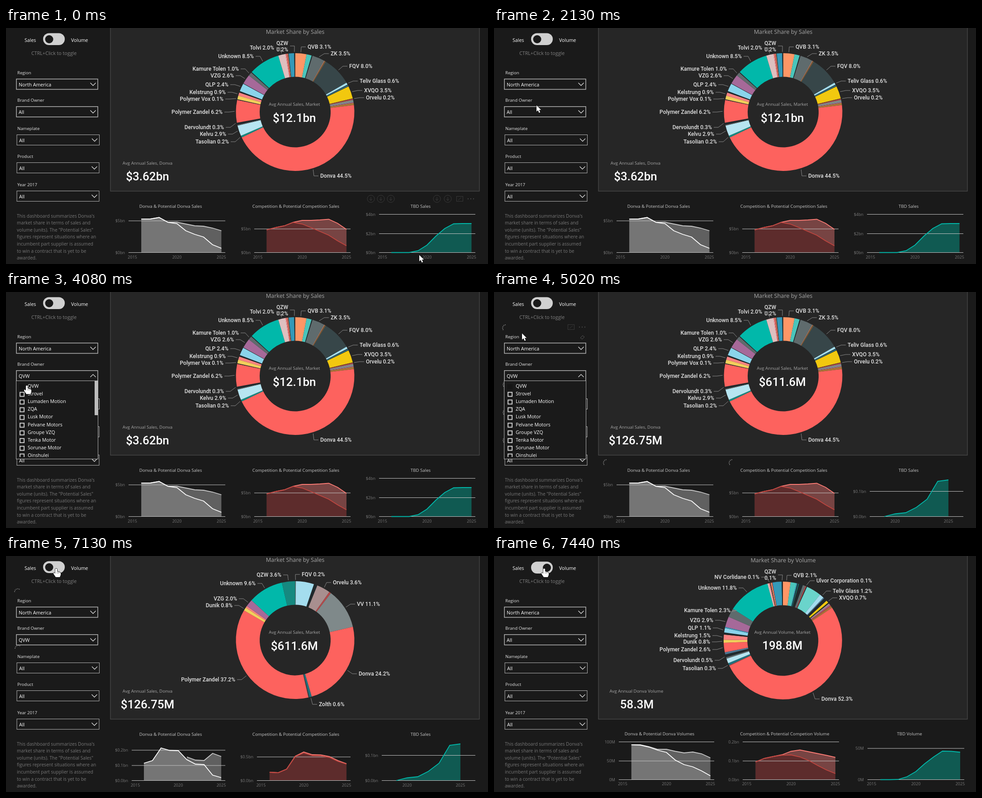
Animation, 1066 px wide and 525 px high, one loop 8000 ms. Source, as an HTML page with a canvas:

```html
<!DOCTYPE html>
<html lang="en">
<head>
<meta charset="utf-8">
<title>Market share dashboard</title>
<style>
html, body { margin: 0; width: 100%; height: 100%; overflow: hidden; background: #1a1a1a; }
canvas { display: block; }
</style>
</head>
<body>
<canvas id="stage" width="1066" height="525"></canvas>
<script>
const c = document.getElementById('stage').getContext('2d');
const LOOP = 8000, BG = '#1a1a1a';
const UI = '"Open Sans", "Noto Sans", sans-serif', NUM = 'Roboto, Inter, sans-serif';

const palette = {
  o: '#fe9666', t: '#4ac5bb', g: '#5f6b6d', d: '#374649', k: '#20292c', b: '#a4ddee',
  y: '#f2c80f', Y: '#f2cf5b', r: '#fd625e', R: '#b5494a', s: '#fb8281', p: '#a66999',
  l: '#8ad4eb', c: '#b7e5f1', P: '#dfbfbf', B: '#3599b8', T: '#01b8aa', e: '#168980',
  E: '#1f7380', G: '#7f898a', w: '#a88f8f', n: '#a87436', m: '#6ad4cb', h: '#4d7591'
};

// Slices run clockwise from the top: end percentage, then palette letter.
const rings = {
  sales: '3.1o 4.5t 4.75k 8.2g 8.35o 8.45k 8.6n 16.7d 17.3b 17.5k 17.7B 17.85k 21.3y 21.4k 21.7R 22.3G 22.5p 23.1n ' +
    '67.9r 68.4e 71.3c 71.5g 72.1k 78.3r 78.5k 79.5Y 80.4s 80.8k 83l 83.1k 85.7p 86.7g 86.9k 95.4T 97.4P 97.7s 97.9R 98.1o 98.25k 99.75B 100k',
  brand: '.2g 5.15b 6.1k 9.8w 10.3R 21.4G 45.5r 46.1E 46.4d 83.4r 84.3Y 84.8s 86.8p 96.4T 100e',
  volume: '2.1o 3.7t 3.95B 4.2k 4.4e 5.5k 6.2g 6.5R 6.7k 10.8m 12b 12.3h 13.2k 13.9y 14.2k 14.5w 14.8p 15.1R 15.6n ' +
    '67.9r 68.1R 68.7E 70c 70.4g 71.2k 71.8h 74.4r 75.2Y 76.6s 77.2k 78.4l 78.7B 81.6p 84.05g 95.8T 96.2P 96.5s 96.7k 97o 97.2R 99.7B 100k'
};

// Text, x of the edge next to the leader, y, percentage the leader points at.
const labels = {
  sales: [
    ['QVB 3.1%', 667, 42, 1.5], ['ZK 3.5%', 718, 57, 6.5], ['FQV 8.0%', 759, 85, 12.7],
    ['Teliv Glass 0.6%', 782, 118, 17], ['XVQO 3.5%', 792, 139, 19.5], ['Orvelu 0.2%', 796, 155, 21.4],
    ['Donva 44.5%', 695, 329, 45.2], ['QZW', 624, 34], ['0.2%', 624, 48], ['', 624, 40, 99.8],
    ['Tolvi 2.0%', 593, 44, 96.4], ['Unknown 8.5%', 548, 63, 91], ['Kamure Tolen 1.0%', 515, 91, 86.2],
    ['VZG 2.6%', 504, 106, 84.4], ['QLP 2.4%', 492, 126, 82], ['Kelstrung 0.9%', 486, 143, 79.9],
    ['Polymer Vox 0.1%', 481, 158, 78.6], ['Polymer Zandel 6.2%', 479, 187, 75.2],
    ['Dervolundt 0.3%', 482, 221, 72], ['Kelvu 2.9%', 487, 236, 69.9], ['Tasolian 0.2%', 493, 253, 68.1]
  ],
  brand: [
    ['FQV 0.2%', 654, 41, .1], ['Orvelu 3.6%', 723, 59, 8], ['VV 11.1%', 776, 107, 15.8],
    ['Donva 24.2%', 780, 262, 33.4], ['Zolth 0.6%', 692, 330, 45.8], ['QZW 3.6%', 609, 42, 98.2],
    ['Unknown 9.6%', 552, 61, 91.6], ['VZG 2.0%', 511, 95, 85.8], ['Dunik 0.8%', 501, 110, 83.8],
    ['Polymer Zandel 37.2%', 507, 275, 64.9]
  ],
  volume: [
    ['QVB 2.1%', 662, 43, 1], ['Ulvor Corporation 0.1%', 713, 55, 6.4], ['Teliv Glass 1.2%', 749, 78, 11.4],
    ['XVQO 0.7%', 763, 93, 13.6], ['Donva 52.3%', 724, 318, 41.7], ['QZW', 624, 35], ['0.1%', 624, 49],
    ['', 624, 42, 99.8], ['NV Corlidane 0.1%', 587, 47, 96.4], ['Unknown 11.8%', 537, 71, 89.9],
    ['Kamure Tolen 2.3%', 523, 121, 82.8], ['VZG 2.9%', 485, 143, 80.1], ['QLP 1.1%', 480, 160, 77.8],
    ['Kelstrung 1.5%', 479, 177, 75.9], ['Dunik 0.8%', 478, 191, 74.8], ['Polymer Zandel 2.6%', 479, 208, 73.1],
    ['Dervolundt 0.5%', 484, 232, 70.6], ['Tasolian 0.3%', 491, 250, 68.2]
  ]
};

const cards = {
  sales: { title: 'Sales', own: 'Avg Annual Sales, Donva', market: '$12.1bn', share: '$3.62bn' },
  brand: { title: 'Sales', own: 'Avg Annual Sales, Donva', market: '$611.6M', share: '$126.75M' },
  volume: { title: 'Volume', own: 'Avg Annual Donva Volume', market: '198.8M', share: '58.3M' }
};

// left/right: grid ends; x: position of year 2020; step: pixels per year; rows: grid label and y.
const charts = {
  sales: [
    { left: 271, right: 485, x: 378, step: 19.67, rows: [['$5bn', 429], ['$0bn', 499.5]],
      top: '425 425 421.5 432 432 436 440 441 445 451', low: '425 425 421.5 432.5 435 451 459 465 482 490' },
    { left: 549, right: 762, x: 655, step: 19.6, rows: [['$5bn', 447], ['$0bn', 499.5]],
      top: '449 444 440 432 428 428 427 425.5 434.5 448', low: '449 444 440 432.5 436 444 452.5 461 473.5 484.5' },
    { left: 825, right: 1038, x: 931, step: 19.7, rows: [['$4bn', 414.5], ['$2bn', 457.5], ['$0bn', 499.5]],
      top: '499.5 499.5 499.5 495.5 483 463 446 435.5 435 435' }
  ],
  brand: [
    { left: 278, right: 485, x: 381, step: 19, rows: [['$0.2bn', 432], ['$0.1bn', 466], ['$0.0bn', 499.5]],
      from: 2021, top: '447 454 455 439 446', low: '461 455 427 432.5 433 453 463 464 487.5 493' },
    { left: 555, right: 762, x: 658.5, step: 18.9, rows: [['$0.5bn', 447], ['$0.0bn', 499.5]],
      top: '481 482 474 445.5 436 442 442.5 446 455 462', low: '481 482 474 446.5 438 444 444.5 448 457 463' },
    { left: 831, right: 1038, x: 887, step: 23.6, rows: [['$0.1bn', 443.5], ['$0.0bn', 499.5]],
      from: 2019, top: '499.5 493.5 491 479 461 421 418' }
  ],
  volume: [
    { left: 276, right: 487, x: 381.5, step: 19.4, rows: [['100M', 413.5], ['50M', 456], ['0M', 497.5]],
      top: '420 420 424 430 430 434.5 438 436 440 449', low: '420 420.5 425 432 437 454 464 469 478 489' },
    { left: 550, right: 763, x: 657, step: 19.6, rows: [['0.2bn', 413.5], ['0.1bn', 456], ['0.0bn', 497.5]],
      top: '458 450 446 442 434.5 431.5 435.5 439.5 443.5 448', low: '458 450 446 443 442.5 447 455 466 476 484' },
    { left: 826, right: 1040, x: 933, step: 19.6, rows: [['50M', 428], ['0M', 497.5]],
      top: '497.5 497.5 497 491 479.5 462 447 434 434.5 436.5' }
  ]
};
const chartInk = [
  { top: '#c8c8c8', low: '#fff', topFill: '#606060', lowFill: '#757575' },
  { top: '#fb7b74', low: '#c0453f', topFill: '#774443', lowFill: '#5d2c2c' },
  { top: '#01b8aa', topFill: '#105a52' }
];
const chartTitles = {
  sales: ['Donva & Potential Donva Sales', 'Competition & Potential Competition Sales', 'TBD Sales'],
  volume: ['Donva & Potential Donva Volumes', 'Competition & Potential Competion Volume', 'TBD Volume']
};

const makers = ['QVW', 'Strovel', 'Lumaden Motion', 'ZQA', 'Lusk Motor', 'Pelvane Motors',
  'Groupe VZQ', 'Tenka Motor', 'Sorunae Motor', 'Qinshulei'];
const note = ["This dashboard summarizes Donva's", 'market share in terms of sales and', 'volume (units). The "Potential Sales"',
  'figures represent situations where an', 'incumbent part supplier is assumed', 'to win a contract that is yet to be', 'awarded.'];

// Pointer stops: time, x, y.
const stops = [[0, 914, 505], [490, 914, 505], [730, 537, 170], [960, 537, 170], [1430, 176, 48], [1670, 176, 48],
  [2130, 94, 172], [2919, 94, 172], [2920, 82, 222], [3250, 90, 254], [3620, 46, 208], [4080, 46, 208], [4870, 64, 78],
  [5020, 62, 92], [5250, 60, 92], [5700, -20, 100], [5820, -20, 100], [6190, 163, 42], [6330, 163, 42],
  [7130, 111, 28], [LOOP, 111, 28]];

function text(s, x, y, size, color, align = 'left', font = UI, weight = 400) {
  c.font = `${weight} ${size}px ${font}`;
  c.textAlign = align;
  c.fillStyle = color;
  c.fillText(s, x, y + size * .36);
}

function line(points, color, width = 1) {
  c.beginPath();
  points.forEach(p => c.lineTo(...p));
  c.strokeStyle = color;
  c.lineWidth = width;
  c.stroke();
}

function box(x, y, w, h, stroke, fill, width = 1) {
  if (fill) { c.fillStyle = fill; c.fillRect(x, y, w, h); }
  c.strokeStyle = stroke;
  c.lineWidth = width;
  c.strokeRect(x, y, w, h);
}

function dot(x, y, r, color) {
  c.beginPath();
  c.arc(x, y, r, 0, 7);
  c.fillStyle = color;
  c.fill();
}

const angle = pct => (pct / 50 - .5) * Math.PI;

function donut(kind) {
  const [cx, cy] = kind === 'volume' ? [638.8, 188] : [639.5, 187];
  let start = 0;
  for (const slice of rings[kind].split(' ')) {
    const end = parseFloat(slice);
    c.beginPath();
    c.arc(cx, cy, 131, angle(start), angle(end));
    c.arc(cx, cy, 78.5, angle(end), angle(start), true);
    c.fillStyle = palette[slice.at(-1)];
    c.fill();
    start = end;
  }
  for (const [s, x, y, pct] of labels[kind]) {
    const right = pct < 50, out = right ? -1 : 1;
    if (pct !== undefined) {
      const a = angle(pct);
      line([[x + out * 4, y], [x + out * 14, y], [cx + 134 * Math.cos(a), cy + 134 * Math.sin(a)]], '#8a8a8a');
    }
    text(s, x, y, 12, '#e4e4e4', right ? 'left' : 'right', NUM, 500);
  }
}

function drawCards(kind) {
  const d = cards[kind];
  const vol = kind === 'volume';
  text(`Market Share by ${d.title}`, 639.5, vol ? 9 : 8, 12.7, '#a6a6a6', 'center');
  text(`Avg Annual ${d.title}, Market`, 637.8, 170, 9.7, '#a6a6a6', 'center');
  text(d.market, 637.8, vol ? 199 : 200, 26, '#fff', 'center', NUM, 500);
  text(d.own, vol ? 315 : 313, 301, 9.7, '#a6a6a6', 'center');
  text(d.share, vol ? 316 : 313, 330, 26, '#fff', 'center', NUM, 500);
}

function chart(kind, i) {
  const d = charts[kind][i], ink = chartInk[i], vol = kind === 'volume';
  const base = d.rows.at(-1)[1];
  const px = year => d.x + (year - 2020) * d.step;
  const series = (s, from) => s.split(' ').map((y, k) => [px(from + k), +y]);
  const area = (pts, color) => {
    c.beginPath();
    c.moveTo(pts[0][0], base);
    pts.forEach(p => c.lineTo(...p));
    c.lineTo(pts.at(-1)[0], base);
    c.fillStyle = color;
    c.fill();
  };
  const top = series(d.top, d.from || 2016), low = d.low && series(d.low, 2016);
  area(top, ink.topFill);
  if (low) area(low, ink.lowFill);
  for (const [s, y] of d.rows) {
    line([[d.left, y], [d.right, y]], '#c4c4c4');
    text(s, d.left - 8, y, 9, '#777', 'right');
  }
  line(top, ink.top, 1.8);
  if (low) line(low, ink.low, 1.8);
  for (const year of [2015, 2020, 2025])
    if (px(year) > d.left) text(year, px(year), vol ? 507 : 510, 9, '#777', 'center');
  const titles = chartTitles[vol ? 'volume' : 'sales'];
  text(titles[i], [364, 641, 917][i] + (vol ? 2 : 0), vol ? 396 : 397, 9.7, '#c8c8c8', 'center');
}

function chevron(x, y, up) {
  const d = up ? -3 : 3;
  line([[x - 6, y - d], [x, y + d], [x + 6, y - d]], '#ddd', 1.3);
}

function slicer(name, value, x, y, w, thick, up) {
  text(name, 25, y - 14, 9.6, '#e6e6e6');
  box(x, y, w, 23, '#b4b4b4', null, thick ? 1.5 : 1);
  text(value, x + 5, y + 12.5, 10.6, '#fff');
  chevron(x + w - 10.5, y + 11.5, up);
}

function dropdown(t) {
  box(22.5, 197.5, 181, 174, '#b4b4b4', BG);
  c.save();
  c.beginPath();
  c.rect(23, 198, 180, 169);
  c.clip();
  makers.forEach((name, i) => {
    const y = 209 + i * 17.15;
    const hover = !i && t >= 2920 && t < 4080, picked = !i && t >= 3930;
    if (picked) { c.fillStyle = '#151515'; c.fillRect(29, y - 4, 12, 12); }
    else box(31, y - 3, 9, 9, hover ? '#666' : '#c8c8c8', null, 2);
    text(name, 48, y, 10.6, hover ? '#a0a0a0' : '#fff');
  });
  c.restore();
  if (t < 4500) { c.fillStyle = '#bdbdbd'; c.fillRect(196, 198, 7, 76); }
}

function spinner(x, y, t) {
  for (let i = 0; i < 5; i++) {
    const a = (260 + .53 * (t - 5020) - i * 28) * Math.PI / 180;
    dot(x + 7 * Math.cos(a), y + 7 * Math.sin(a), 1.1, '#777');
  }
}

function hoverIcons(x, y, rings) {
  const ink = '#383838';
  for (const dx of rings) {
    c.beginPath();
    c.arc(x + dx, y, 8, 0, 7);
    c.strokeStyle = ink;
    c.lineWidth = 1;
    c.stroke();
    line([[x + dx - 3, y], [x + dx, y + 4], [x + dx + 3, y]], ink);
    line([[x + dx, y - 4], [x + dx, y + 4]], ink);
  }
  box(x - 6.5, y - 5.5, 14, 11, ink);
  line([[x - 3, y + 3], [x + 4, y - 3]], ink);
  for (let i = 0; i < 3; i++) dot(x + 19 + i * 6, y, 1.2, '#444');
}

function pointer(t) {
  const i = stops.findIndex(s => s[0] > t);
  const [t0, x0, y0] = stops[i - 1], [t1, x1, y1] = stops[i];
  const u = (t - t0) / (t1 - t0), k = u * u * (3 - 2 * u);
  const hand = (t >= 2920 && t < 4400) || t > 6850;
  c.save();
  c.translate(x0 + (x1 - x0) * k, y0 + (y1 - y0) * k);
  const shape = new Path2D(hand
    ? 'M-2 1Q0-1 2 1V7Q4 5 5 8Q7 6 8 9Q10 8 10 11V14L8 19H-1L-5 13Q-7 10-5 9L-2 11Z'
    : 'M0 0V14L3.3 11L5.7 16.7L8.2 15.6L5.8 10.2H10.2Z');
  c.lineWidth = 1.4;
  c.strokeStyle = '#111';
  c.stroke(shape);
  c.fillStyle = '#fff';
  c.fill(shape);
  if (hand) for (const x of [2, 5]) line([[x, 8], [x, 11]], '#333', .7);
  c.restore();
}

function draw(t) {
  const kind = brandAt => t >= 7300 ? 'volume' : t >= brandAt ? 'brand' : 'sales';
  const open = t >= 2520 && t < 5250, toggled = t >= 7200;
  const brand = t >= 4080 && t < 7300 ? makers[0] : 'All';

  c.fillStyle = BG;
  c.fillRect(0, 0, 1066, 525);
  box(231, -5, 816, 368, '#555', '#262626');
  donut(kind(5400));
  drawCards(kind(4450));
  [5300, 5350, 4700].forEach((at, i) => chart(kind(at), i));

  text('Sales', 41, 27, 10.6, '#fff', 'left', UI, 500);
  text('Volume', 144, 27, 10.6, '#fff', 'left', UI, 500);
  text('CTRL+Click to toggle', 56, 56, 10.7, '#808080');
  c.beginPath();
  c.roundRect(82, toggled ? 12.5 : 11.5, 48, 26.5, 13.2);
  c.fillStyle = '#d0d0d0';
  c.fill();
  dot(toggled ? 117 : 95.5, toggled ? 26 : 25, 9, BG);

  const loading = t >= 4150 && t < 7300;
  if (loading) {
    spinner(26, 80, t);
    spinner(27, 206, t);
    if (t < 5400) [268, 330].forEach(y => spinner(27, y, t));
    if (t < 5300) [249, 527].forEach(x => spinner(x, 380, t));
  }
  c.fillStyle = BG;
  c.fillRect(23, 176, 180, 22);
  slicer('Region', 'North America', 23, 113.5, 180, true);
  slicer('Brand Owner', brand, 23, 174.8, 180, true, open);
  slicer('Nameplate', 'All', 24, 237.5, 182.5);
  slicer('Product', 'All', 24, 299.5, 182);
  slicer('Year 2017', 'All', 24, 362.5, 182);
  note.forEach((s, i) => text(s, 24, 418 + i * 15.6, 10.1, '#777'));
  if (open) dropdown(t);

  if (t < 570) hoverIcons(1003, 380, [-196, -174, -152, -50, -26]);
  if (t > 4800 && t < 5500) {
    hoverIcons(170, 78, []);
    line([[191, 102], [196, 97], [200, 100], [195, 105], [191, 102]], '#555');
  }
  pointer(t);
}

function frame(now) {
  draw(now % LOOP);
  requestAnimationFrame(frame);
}
requestAnimationFrame(frame);
</script>
</body>
</html>
```
